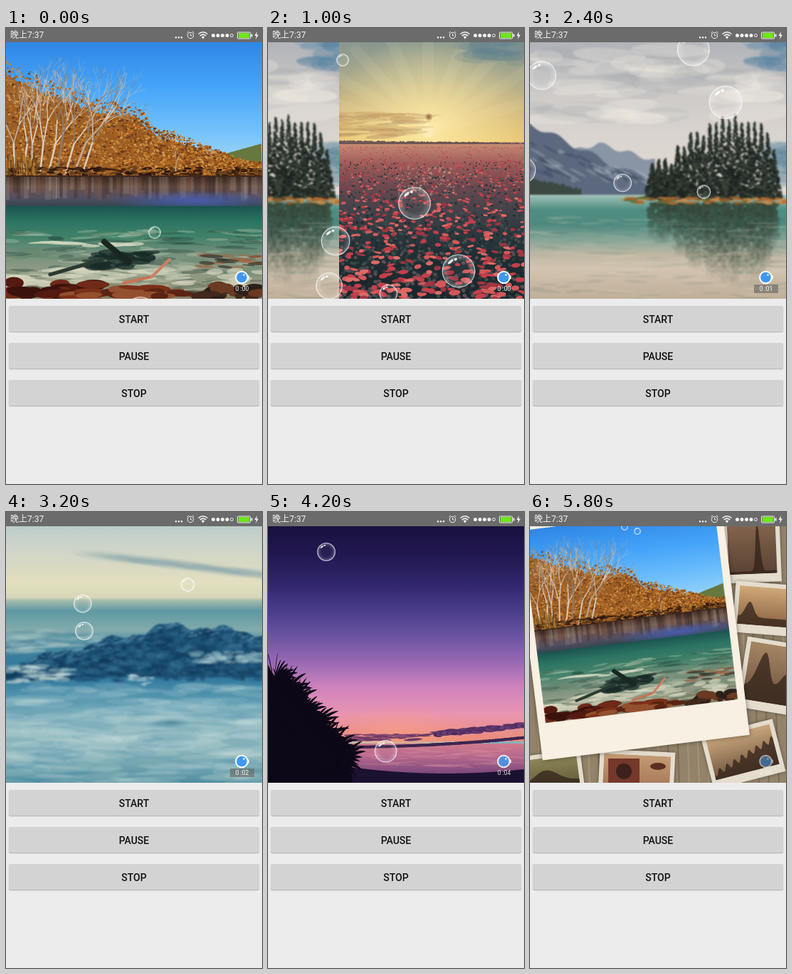
These frames come from a looping animation (360x640 px, 6000 ms). An HTML page with a canvas:

```html
<!DOCTYPE html>
<html lang="en">
<head>
<meta charset="utf-8">
<title>Photo slideshow</title>
<style>
  html, body { margin: 0; width: 100%; height: 100%; overflow: hidden; background: #ececec; }
  #stage { position: relative; width: 360px; height: 640px; overflow: hidden; font-family: Roboto, sans-serif; }
  #bar { position: absolute; inset: 0 0 auto; height: 20px; background: #6b6b6b; color: #f2f2f2; }
  #clock { position: absolute; left: 6px; font: 12px/20px Roboto, "Noto Sans CJK SC", "Noto Sans CJK", sans-serif; }
  #bar svg { position: absolute; left: 230px; }
  canvas { position: absolute; left: 0; top: 20px; }
  #buttons { position: absolute; left: 4px; top: 390px; width: 352px; display: grid; gap: 16px; }
  #buttons div { height: 36px; border-radius: 2px; background: #d3d3d3; box-shadow: 0 1px 1.5px rgba(0,0,0,.27);
    color: #111; font: 500 14px/38.5px Roboto, sans-serif; text-align: center; }
  #recorder { position: absolute; left: 315px; top: 339px; width: 34px; height: 33px; }
  #time { position: absolute; top: 21px; width: 34px; color: #fff; text-align: center; font: 8.5px/12px Roboto, sans-serif; }
  #time.boxed { background: rgba(105,105,100,.65); }
</style>
</head>
<body>
<div id="stage">
  <div id="bar">
    <span id="clock">晚上7:37</span>
    <svg width="130" height="20" fill="none" stroke="#f2f2f2">
      <path d="M9 13.3h9" stroke-width="2.6" stroke-linecap="round" stroke-dasharray="0 4"/>
      <path d="M61.500 10.500h20" stroke-width="5" stroke-linecap="round" stroke-dasharray="0 6.500"/>
      <circle cx="87.500" cy="10.500" r="2"/>
      <circle cx="29.500" cy="10.500" r="4.200"/><path d="M29.500 8v2.800h2M24.500 7l2.500-2.200M34.500 7l-2.500-2.200"/>
      <path d="M40.500 8.500q6.500-5.500 13 0M42.700 11q4.300-3.700 8.600 0" stroke-width="1.500"/>
      <path d="M47 15.500l-2.300-3q2.300-1.800 4.600 0zM123 5l-3.500 6h2.500l-1 5 4-6.500h-2.500z" fill="#f2f2f2" stroke="none"/>
      <rect x="95.500" y="6" width="18" height="9" rx="1"/><path d="M97 10.500h15" stroke="#6ee619" stroke-width="7"/>
      <path d="M115.500 8.500v4" stroke-width="2"/>
    </svg>
  </div>
  <canvas id="view" width="360" height="360"></canvas>
  <div id="recorder">
    <svg width="34" height="22">
      <circle cx="16.500" cy="11" r="9.300" fill="#fff"/><rect x="24" y="8.500" width="3" height="5" rx="1" fill="#fff"/>
      <circle cx="16.500" cy="11" r="7.300" fill="#3f98ee"/><circle cx="19.500" cy="7.500" r="1.200" fill="#fff"/>
    </svg>
    <div id="time">0 :00</div>
  </div>
  <div id="buttons"><div>START</div><div>PAUSE</div><div>STOP</div></div>
</div>
<script>
const LOOP = 6000, STEP = 200, SIZE = 360;
const view = document.getElementById('view').getContext('2d');
const timeLabel = document.getElementById('time');
const recorder = document.getElementById('recorder');

let seed = 7;
const rnd = () => (seed = (seed * 16807) % 2147483647) / 2147483647;
const between = (a, b) => a + (b - a) * rnd();
const pick = list => list[Math.floor(rnd() * list.length)];
const mix = (a, b, k) => a + (b - a) * k;
const clamp = k => Math.max(0, Math.min(1, k));
const hump = (x, centre, width) => Math.exp(-(((x - centre) / width) ** 2));

// Pictures use stage coordinates; a light blur blends the brushwork
function paint(draw, blur) {
  const [sharp, soft] = [0, 1].map(() => {
    const c = document.createElement('canvas').getContext('2d');
    c.canvas.width = c.canvas.height = SIZE;
    return c;
  });
  sharp.translate(0, -20);
  sharp.lineCap = 'round';
  draw(sharp);
  soft.drawImage(sharp.canvas, 0, 0);
  soft.filter = `blur(${blur}px)`;
  soft.drawImage(sharp.canvas, 0, 0);
  return soft.canvas;
}

function wash(c, y0, y1, ...colors) {
  const g = c.createLinearGradient(0, y0, 0, y1);
  colors.forEach((color, i) => g.addColorStop(i / (colors.length - 1), color));
  c.fillStyle = g;
  c.fillRect(0, y0, SIZE, y1 - y0);
}

function glow(c, x, y, r, rgb, alpha, flat = 1) {
  const g = c.createRadialGradient(0, 0, 0, 0, 0, r);
  g.addColorStop(0, `rgba(${rgb},${alpha})`);
  g.addColorStop(1, `rgba(${rgb},0)`);
  c.save();
  c.translate(x, y);
  c.scale(1, flat);
  c.fillStyle = g;
  c.fillRect(-r, -r, 2 * r, 2 * r);
  c.restore();
}

function land(c, color, x0, x1, top, bottom) {
  c.fillStyle = color;
  c.beginPath();
  c.moveTo(x0, bottom);
  for (let x = x0; x <= x1; x += 2) c.lineTo(x, top(x));
  c.lineTo(x1, bottom);
  c.fill();
}

function line(c, color, width, x0, y0, x1, y1) {
  c.strokeStyle = color;
  c.lineWidth = width;
  c.beginPath();
  c.moveTo(x0, y0);
  c.lineTo(x1, y1);
  c.stroke();
}

// place(k) gives x, y, half width, half height and tilt
function dabs(c, n, colors, place) {
  for (let i = 0; i < n; i++) {
    const [x, y, rx, ry, tilt = 0] = place(i / n);
    c.fillStyle = pick(colors);
    c.beginPath();
    c.ellipse(x, y, rx, ry, tilt, 0, 7);
    c.fill();
  }
}

// Dabs spread evenly over a box
function scatter(c, n, colors, x0, x1, y0, y1, rx, ry) {
  dabs(c, n, colors, () => [between(x0, x1), between(y0, y1), rx * between(.5, 1.5), ry * between(.5, 1.5), between(-.1, .1)]);
}

function branch(c, x, y, len, a, w) {
  const x2 = x + Math.sin(a) * len, y2 = y - Math.cos(a) * len;
  line(c, pick(['#d9cdbd', '#bfae9b', '#927a66']), w, x, y, x2, y2);
  if (len < 9) return;
  for (const side of [-1, 1])
    branch(c, x2, y2, len * between(.62, .84), a + side * between(.05, .4), w * .7);
}

const autumn = paint(c => {
  wash(c, 20, 208, '#2f87e6', '#45a4f8', '#74c2fb', '#b4dff4');
  land(c, '#66783f', 285, SIZE, x => 183 - (x - 285) * .28, 208);
  const crown = x => 40 + 147 * clamp(x / 340) ** .9 - 14 * hump(x, 180, 35) + 12 * hump(x, 212, 14);
  land(c, '#9c5f27', 0, SIZE, x => crown(x) + 20 * (1 - x / 380) + between(0, 9), 208);
  dabs(c, 4200, ['#b7691f', '#8a4d19', '#c58335', '#69391a', '#d19a50', '#a65c1c'], () => {
    const x = between(0, SIZE);
    return [x, mix(crown(x), 206, rnd() ** .8), between(.7, 2.6), between(.6, 1.8)];
  });
  for (let x = 12; x < 110; x += 12) branch(c, x, 203, between(36, 46), between(-.1, .1) + x * .003, 2.6);
  branch(c, 238, 204, 14, .1, 1.4);
  scatter(c, 230, ['#2b180f', '#46270f', '#6b431f'], 0, SIZE, 196, 208, 4, 1.5);
  scatter(c, 70, ['#a87834', '#6a451c'], 0, 45, 180, 205, .8, 6);

  wash(c, 207, 252, '#38251d', '#665048', '#564f5f', '#2f4650');
  for (let x = 0; x < SIZE; x += 5) {
    c.fillStyle = pick(['rgba(230,210,190,.14)', 'rgba(40,24,18,.2)', 'rgba(160,100,60,.15)']);
    c.fillRect(x, 209, between(3, 9), between(18, 34));
  }
  glow(c, 265, 242, 120, '72,96,190', .8, .12);
  wash(c, 250, 380, '#1b5450', '#2c7562', '#41816a', '#718f7b', '#8b9985', '#93967d', '#847d62');
  scatter(c, 200, ['rgba(215,220,195,.28)', 'rgba(30,62,52,.3)', 'rgba(90,125,100,.3)'], 0, SIZE, 284, 380, 20, 2.2);
  scatter(c, 45, ['rgba(212,214,189,.65)'], 0, SIZE, 338, 366, 20, 3);
  scatter(c, 12, ['rgba(211,216,191,.8)'], 50, 180, 300, 306, 16, 2);
  scatter(c, 22, ['rgba(23,42,38,.7)'], 115, 200, 315, 335, 16, 4);
  line(c, '#1a2622', 8, 138, 300, 172, 328);
  line(c, '#2b3a31', 5, 62, 346, 135, 325);
  scatter(c, 22, ['#54190f', '#6f2a18', '#3c120c'], 0, 125, 357, 376, 20, 6);
  scatter(c, 26, ['#7b3019', '#93502f', '#5b2414'], 95, 240, 364, 380, 20, 5);
  line(c, '#c67453', 4, 165, 358, 205, 349);
  line(c, '#cc8060', 4, 205, 349, 230, 325);
  scatter(c, 28, ['#43291c', '#2b201a', '#6b3a22'], 275, SIZE, 362, 380, 12, 5);
  scatter(c, 22, ['rgba(55,52,42,.7)', 'rgba(165,100,65,.6)'], 270, SIZE, 318, 336, 12, 2);
}, .7);

const poppies = paint(c => {
  wash(c, 20, 163, '#87968f', '#a9a98c', '#d2ba80', '#ecc974');
  glow(c, 225, 146, 140, '255,236,165', .9);
  for (let a = -1.2; a < 1.3; a += .3) line(c, 'rgba(255,240,190,.07)', 16, 225, 146, 225 + Math.sin(a) * 180, 146 - Math.cos(a) * 140);
  scatter(c, 50, ['rgba(150,115,85,.2)', 'rgba(190,145,90,.25)'], 70, 205, 120, 153, 26, 2.5);
  scatter(c, 12, ['rgba(90,125,140,.2)'], 290, SIZE, 20, 50, 30, 9);
  glow(c, 226, 125, 6, '140,95,55', 1);
  wash(c, 160, 380, '#c99278', '#9c5a58', '#6d4850', '#45424a', '#2d3a40', '#212f34', '#1d292e', '#1a252a');
  land(c, '#6d5654', 0, SIZE, x => 156 + x * .012 + between(0, 2), 163);
  const spread = d => 167 + 213 * d;
  dabs(c, 1800, ['#2c3c3c', '#1f2d31', '#3b4d4a', '#594e55'], () => {
    const d = between(.1, 1);
    return [between(0, SIZE), spread(d), .8 + 2.4 * d, .6 + 2 * d, between(-1, 1)];
  });
  // Flowers grow larger and rarer toward the viewer
  dabs(c, 1500, ['#c43f4b', '#d2585a', '#a03643', '#dd6b66'], () => {
    const d = rnd() ** 2.4;
    return [between(0, SIZE), spread(d), .9 + 9 * d, .6 + 4 * d, between(-.3, .3)].map((v, i) => i > 1 && i < 4 ? v * between(.45, .9) : v);
  });
  scatter(c, 130, ['rgba(225,185,150,.4)'], 180, 262, 195, 235, 1.2, 1.2);
}, .6);

const lake = paint(c => {
  wash(c, 20, 236, '#b0b3b8', '#cdcac8', '#dcd6d0', '#e2dad1');
  scatter(c, 60, ['rgba(240,234,224,.3)', 'rgba(150,155,165,.14)'], 0, SIZE, 25, 130, 45, 9);
  scatter(c, 14, ['rgba(85,128,160,.35)'], 322, 372, 20, 58, 24, 7);
  scatter(c, 12, ['rgba(80,125,150,.3)'], 335, 372, 165, 215, 20, 8);
  land(c, '#8994a4', 60, 176, x => 162 + Math.abs(x - 96) * .3 + 3 * Math.sin(x / 6), 236);
  land(c, '#5b687d', 0, 174, x => 134 + x * .5 + 4 * Math.sin(x / 8), 236);
  dabs(c, 60, ['rgba(205,212,222,.25)', 'rgba(50,60,82,.3)'], () => {
    const x = between(0, 160);
    return [x, between(158 + x * .3, 215), between(4, 13), 2, .5];
  });
  land(c, '#3c4842', 0, 72, x => 209 + x * .2 + between(0, 5), 236);
  wash(c, 234, 380, '#a4c3ba', '#4f8e82', '#4f8a7f', '#86a597', '#bfb8a4', '#d2c4b0', '#c8b8a3', '#c0af99');

  const crown = x => 195 - 52 * hump(x, 245, 38) - 62 * hump(x, 305, 40);
  for (let x = 172; x < 348; x += 9) {
    const top = crown(x) + between(-12, 16), h = 240 - top;
    for (let y = 0; y < h; y += 3)
      line(c, `rgba(52,68,54,${.75 * (1 - y / h)})`, 5, x + between(-7, 0), 247 + y, x + between(0, 7), 247 + y);
    dabs(c, 130, ['#222b26', '#2e3830', '#1a211e', '#3a4237'], k =>
      [x + between(-1, 1) * (1 + 9 * k), top + h * k, 1 + 3 * k, 1.8, between(-.4, .4)]);
  }
  scatter(c, 150, ['rgba(225,215,195,.2)', 'rgba(70,110,100,.16)'], 0, SIZE, 265, 380, 18, 1.2);
  scatter(c, 90, ['#b26a30', '#8a5a2c', '#c88a48', '#5d6a30'], 132, SIZE, 238, 246, 6, 1.4);
}, 1.2);

const clouds = paint(c => {
  wash(c, 20, 128, '#bccdca', '#ccd4c9', '#d8d9c4', '#e3dfbf', '#cfd2b5');
  dabs(c, 40, ['rgba(125,155,160,.09)'], k => [140 + k * 240, 62 + k * 28 + between(-4, 4), 50, 4, .13]);
  wash(c, 122, 172, '#b1c1ae', '#5f98a3', '#74a4a8', '#8db0ad');
  wash(c, 168, 380, '#78a6ac', '#3c82a0', '#2b739a', '#5295ae', '#88b5bf', '#96bdc1', '#79a9b2', '#518f9f');
  scatter(c, 80, ['rgba(195,215,205,.22)', 'rgba(60,115,140,.2)'], 0, 130, 166, 205, 20, 2);
  const ridge = x => 216 - 58 * clamp(x / 230) + 12 * clamp((x - 240) / 120) + 4 * Math.sin(x / 13) + 2 * Math.sin(x / 5);
  land(c, '#1d5274', 20, SIZE, ridge, 232);
  dabs(c, 900, ['rgba(18,62,97,.4)', 'rgba(36,98,134,.35)', 'rgba(14,50,82,.4)', 'rgba(80,142,172,.22)'], () => {
    const x = between(0, SIZE);
    return [x, mix(ridge(x) + 2, 236, rnd()), between(3, 10), between(1.5, 4)];
  });
  dabs(c, 160, ['rgba(130,180,198,.35)', 'rgba(60,120,155,.4)'], k => [k * SIZE, ridge(k * SIZE) + between(-1, 9), between(2, 5), 1.2, -.3]);
  scatter(c, 45, ['rgba(195,217,215,.4)'], 0, 90, 216, 240, 10, 2.5);
  scatter(c, 40, ['rgba(175,208,212,.35)'], 265, SIZE, 196, 214, 9, 2.5);
  scatter(c, 14, ['rgba(190,215,220,.5)'], 175, 205, 228, 244, 7, 1.6);
  scatter(c, 260, ['rgba(190,215,212,.2)', 'rgba(70,140,165,.16)', 'rgba(215,228,220,.16)'], 0, SIZE, 245, 380, 34, 4);
  glow(c, 232, 296, 28, '45,105,130', .6, .25);
}, 1);

const sunset = paint(c => {
  wash(c, 20, 322, '#19113f', '#21174f', '#2e2468', '#463987', '#67529f', '#9668b3', '#cf83bd', '#e994b0', '#ea8c78');
  glow(c, 185, 316, 110, '255,165,125', .5, .4);
  dabs(c, 110, ['#553163', '#6b3d72', '#472a5c'], k => [235 + k * 130, 312 - k * 13 + between(-3, 3), between(4, 11), between(1, 3)]);
  scatter(c, 40, ['#8a4a72', '#6c3c68'], 115, 225, 312, 320, 10, 1.3);
  wash(c, 325, 380, '#d07a8e', '#b5688c', '#88507f', '#603a6c');
  for (let i = 0; i < 60; i++) {
    const x = 100 + i * 4.4;
    line(c, '#3d2552', 4, x, 330 - (i / 60) ** 2 * 14, x + 5, 330 - (i / 60) ** 2 * 14);
  }
  scatter(c, 50, ['rgba(240,160,170,.2)'], 130, SIZE, 332, 358, 16, 1);
  land(c, '#1b1130', 90, SIZE, x => 367 - ((x - 250) / 45) ** 2, 380);
  land(c, '#0d0817', 0, 118, x => 228 + 112 * (x / 100) ** 1.4, 380);
  c.fillStyle = '#0d0817';
  for (let i = 0; i < 8; i++) {
    const x = 8 + i * 13, y = 238 + i * 16;
    for (let a = 0; a < 6.2; a += .18) {
      const r = between(26, 46), dx = Math.cos(a) * r, dy = Math.sin(a) * r;
      c.beginPath();
      c.moveTo(x, y - 2);
      c.quadraticCurveTo(x + dx * .6, y + dy * .6 - 10, x + dx, y + dy);
      c.quadraticCurveTo(x + dx * .5, y + dy * .5 - 2, x, y + 4);
      c.fill();
    }
  }
}, .5);

// A sepia print with a dark skyline
function print(c, x, y, w, h, tilt, top, bottom, skyline) {
  c.save();
  c.translate(x, y);
  c.rotate(tilt);
  c.shadowColor = 'rgba(0,0,0,.4)';
  c.shadowBlur = 5;
  c.fillStyle = '#e4dccd';
  c.fillRect(-w / 2 - 6, -h / 2 - 6, w + 12, h + 18);
  c.shadowBlur = 0;
  c.beginPath();
  c.rect(-w / 2, -h / 2, w, h);
  c.clip();
  c.translate(-w / 2, 0);
  wash(c, -h / 2, h / 2, top, bottom);
  land(c, 'rgba(50,34,25,.75)', 0, w, u => h * skyline(u / w), h / 2);
  c.restore();
}

const pile = paint(c => {
  c.fillStyle = '#93836a';
  c.fillRect(0, 20, SIZE, SIZE);
  for (let x = 0; x < SIZE; x += 14) line(c, pick(['#7d6d56', '#a39376']), 2, x, 20, x + 14, 380);
  print(c, 312, 48, 68, 78, -.04, '#86684f', '#5a4334', u => .45 - .9 * hump(u, .62, .06));
  print(c, 333, 133, 80, 54, .08, '#d0a878', '#8a6242', u => .3 - .4 * hump(u, .2, .1));
  print(c, 343, 228, 78, 82, .16, '#a58664', '#6a5140', u => .25 - .6 * hump(u, .3, .15) - .3 * hump(u, .75, .15));
  print(c, 299, 337, 92, 58, -.25, '#c8a67c', '#6f5440', u => .36 - .5 * u + .08 * Math.sin(u * 50));
  print(c, 150, 365, 94, 48, .05, '#c49b74', '#a37555', () => .5);
  print(c, 30, 366, 76, 44, -.13, '#8f8658', '#5f5b38', u => .3 - .4 * hump(u, .4, .3));
  c.fillStyle = '#76382a';
  c.fillRect(110, 346, 44, 34);
  dabs(c, 2, ['#3e211c', '#5a3024'], k => [132 + k * 96, 364 - k * 14, 11, 11 - k * 12]);
}, .4);

// Pull back from the full picture (0) to the pile of prints (1)
const END = { x: 140.5, y: 144.5, turn: -.122, size: .756 };
function drawPullback(c, k) {
  const size = mix(1, END.size, k);
  c.save();
  c.translate(mix(180, END.x, k), mix(200, END.y, k));
  c.rotate(END.turn * k);
  c.scale(size, size);
  c.save();
  c.scale(1 / END.size, 1 / END.size);
  c.rotate(-END.turn);
  c.drawImage(pile, -END.x, 20 - END.y);
  c.restore();
  c.shadowColor = 'rgba(0,0,0,.45)';
  c.shadowBlur = 7;
  c.fillStyle = '#f8f0e2';
  c.fillRect(-194, -196, 388, 444);
  c.shadowBlur = 0;
  c.drawImage(autumn, -180, -180);
  c.restore();
}

// Bubbles float in straight lines: a place at one moment, then px per second sideways and up
const bubbles = [
  { r: 9, at: 0, x: 209, y: 287, drift: -104, rise: 242 },
  { r: 23, at: 1000, x: 206, y: 246, drift: 17, rise: 154 },
  { r: 20.5, at: 1000, x: 95, y: 299, drift: -56, rise: 166 },
  { r: 23.5, at: 1000, x: 268, y: 341, drift: 5, rise: 169 },
  { r: 19, at: 1000, x: 86, y: 362, drift: -69, rise: 116 },
  { r: 13, at: 1800, x: 147, y: 284, drift: -28, rise: 111 },
  { r: 10, at: 1800, x: 236, y: 326, drift: 14, rise: 160 },
  { r: 13, at: 4200, x: 82, y: 56, drift: -28, rise: 111 },
  { r: 16, at: 5000, x: 136, y: 247, drift: -37, rise: 111 },
  { r: 11, at: 5000, x: 93, y: 267, drift: 10, rise: 160 },
  { r: 20, at: 5000, x: 157, y: 390, drift: 0, rise: 111 },
  { r: 14, at: 5000, x: 207, y: 389, drift: 0, rise: 111 }
];

function drawBubble(c, x, y, r) {
  const g = c.createRadialGradient(x, y, r * .55, x, y, r);
  g.addColorStop(0, 'rgba(255,255,255,.04)');
  g.addColorStop(1, 'rgba(255,255,255,.3)');
  c.fillStyle = g;
  c.strokeStyle = 'rgba(255,255,255,.65)';
  c.lineWidth = 1.3;
  c.beginPath();
  c.arc(x, y, r - .7, 0, 7);
  c.fill();
  c.stroke();
  dabs(c, 2, ['rgba(255,255,255,.85)'], k => [x - r * (.48 - .6 * k), y - r * (.55 + .3 * k), r * (.2 - .2 * k), r * .08, -.7 + k]);
}

function drawBubbles(c, t) {
  for (const b of bubbles) {
    const s = (t - b.at) / 1000;
    // Only those within 1.6 s of their moment are afloat
    if (Math.abs(s) < 1.6) drawBubble(c, b.x + b.drift * s, b.y - b.rise * s, b.r);
  }
}

// Picture, start and end of its slide in from the left
const slides = [
  [autumn, -1, 0], [poppies, 200, 600], [lake, 800, 1520],
  [clouds, 2400, 2900], [sunset, 3500, 4000], [autumn, 4500, 4900]
];

function render(t) {
  view.setTransform(1, 0, 0, 1, 0, 0);
  for (const [picture, from, to] of slides)
    if (t > from) view.drawImage(picture, SIZE * (clamp((t - from) / (to - from)) - 1), 0);
  view.translate(0, -20);
  const pull = clamp((t - 5200) / 600);
  if (pull) {
    drawPullback(view, pull);
    for (const side of [-1, 1]) drawBubble(view, 142 + side * 9, mix(230, 24, pull) + side * 3, 5);
  } else drawBubbles(view, t);

  const seconds = Math.max(0, Math.floor((t - 1080) * .0013));
  timeLabel.textContent = '0 :0' + seconds;
  timeLabel.className = t > 1080 && t < 4000 ? 'boxed' : '';
  recorder.style.opacity = t >= 5000 ? .55 : t >= 4000 ? .85 : 1;
}

const start = performance.now();
let shown = -1;
function tick() {
  const t = Math.floor((performance.now() - start) / STEP) * STEP % LOOP;
  if (t !== shown) render(shown = t);
  requestAnimationFrame(tick);
}
tick();
</script>
</body>
</html>
```
